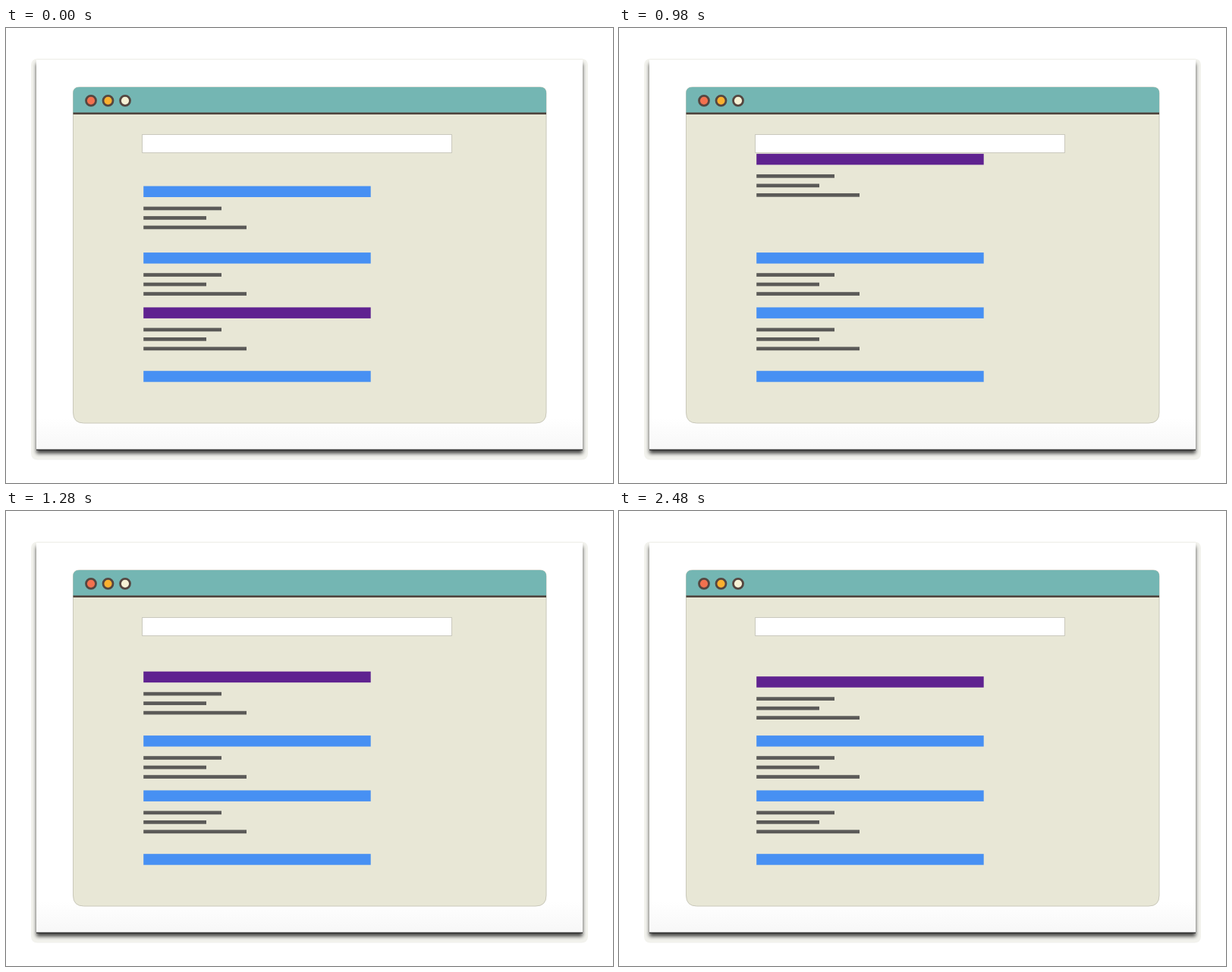
Recreate the animation shown at these times as an HTML page. Size 800 by 600 pixels, loop 3060 ms.

```html
<!DOCTYPE html>
<html lang="en">
<head>
<meta charset="utf-8">
<title>Search result rising to the top</title>
<style>
  html, body { margin: 0; width: 100%; height: 100%; overflow: hidden; background: #fff; }
  svg { display: block; width: 100%; height: 100%; }
</style>
</head>
<body>
<svg viewBox="0 0 800 600" xmlns="http://www.w3.org/2000/svg">
  <defs>
    <filter id="soft" x="-5%" y="-5%" width="110%" height="110%"><feGaussianBlur stdDeviation="2.6"/></filter>
    <linearGradient id="paper" x1="0" y1="0" x2="0" y2="1">
      <stop offset=".92" stop-color="#fff"/>
      <stop offset="1" stop-color="#f7f7f7"/>
    </linearGradient>
    <g id="lines" fill="#5b5a58">
      <rect y="27.1" width="102.8" height="4.7"/>
      <rect y="39.6" width="82.8" height="4.7"/>
      <rect y="52.1" width="135.8" height="4.7"/>
    </g>
  </defs>

  <rect x="33" y="40.5" width="734" height="529" rx="8" fill="#f2f2ed"/>
  <rect x="40" y="47" width="720" height="514" filter="url(#soft)" opacity=".72"/>
  <rect x="40" y="42" width="720" height="514" fill="url(#paper)"/>
  <rect x="40" y="555.6" width="720" height="1.2" fill="#222"/>

  <path d="M88.5 112V86q0-8 8-8H704q8 0 8 8V507q0 14-14 14H102.500q-14 0-14-14Z" fill="#e8e7d6" stroke="#c9c8ba"/>
  <path d="M88.500 112V86q0-8 8-8H704q8 0 8 8V112Z" fill="#74b6b3"/>
  <rect x="88.5" y="111.4" width="623.5" height="2.6" fill="#51453e"/>
  <g stroke="#554640" stroke-width="2.8">
    <circle cx="112" cy="95.800" r="6.5" fill="#f2714f"/>
    <circle cx="134.500" cy="95.800" r="6.5" fill="#fbb02f"/>
    <circle cx="157" cy="95.800" r="6.5" fill="#f6f1d5"/>
  </g>
  <rect x="179.5" y="140.500" width="408" height="24" fill="#fff" stroke="#cac9bd"/>
  <g id="results"></g>
</svg>
<script>
  const LOOP = 3060, SWAP = 880, SETTLED = 1840;
  const SPRING_START = 828, SPRING_TIME = 1000, PERIOD = 0.3;
  const FROM = 368.4, TO = 218.2;
  const BLUE = '#4790f3', PURPLE = '#5f2290';

  const results = document.getElementById('results');

  function addNode(parent, tag, attrs) {
    const node = document.createElementNS('http://www.w3.org/2000/svg', tag);
    for (const key in attrs) node.setAttribute(key, attrs[key]);
    return parent.appendChild(node);
  }

  function addResult(y, color, withLines = true) {
    const group = addNode(results, 'g', {});
    addNode(group, 'rect', { width: 299.5, height: 14.5, fill: color });
    if (withLines) addNode(group, 'use', { href: '#lines' });
    place(group, y);
    return group;
  }

  function place(group, y) {
    group.setAttribute('transform', `translate(181.2 ${y.toFixed(2)})`);
  }

  const first = addResult(208.5, BLUE);
  addResult(296.1, BLUE);
  const third = addResult(FROM, BLUE);
  addResult(452.2, BLUE, false);
  const visited = addResult(FROM, PURPLE);

  function visitedY(t) {
    if (t < SWAP + 20) return FROM;
    if (t >= SETTLED) return TO;
    // elastic ease-out
    const u = (t - SPRING_START) / SPRING_TIME;
    return TO + (FROM - TO) * 2 ** (-10 * u) * Math.cos(2 * Math.PI * u / PERIOD);
  }

  function draw(t) {
    first.setAttribute('visibility', t < SWAP ? 'visible' : 'hidden');
    third.setAttribute('visibility', t < SWAP + 20 ? 'hidden' : 'visible');
    place(visited, visitedY(t));
  }

  const start = performance.now();
  function tick() {
    const t = (performance.now() - start) % LOOP;
    draw(Math.floor(t / 20) * 20);
    requestAnimationFrame(tick);
  }
  tick();
</script>
</body>
</html>
```
